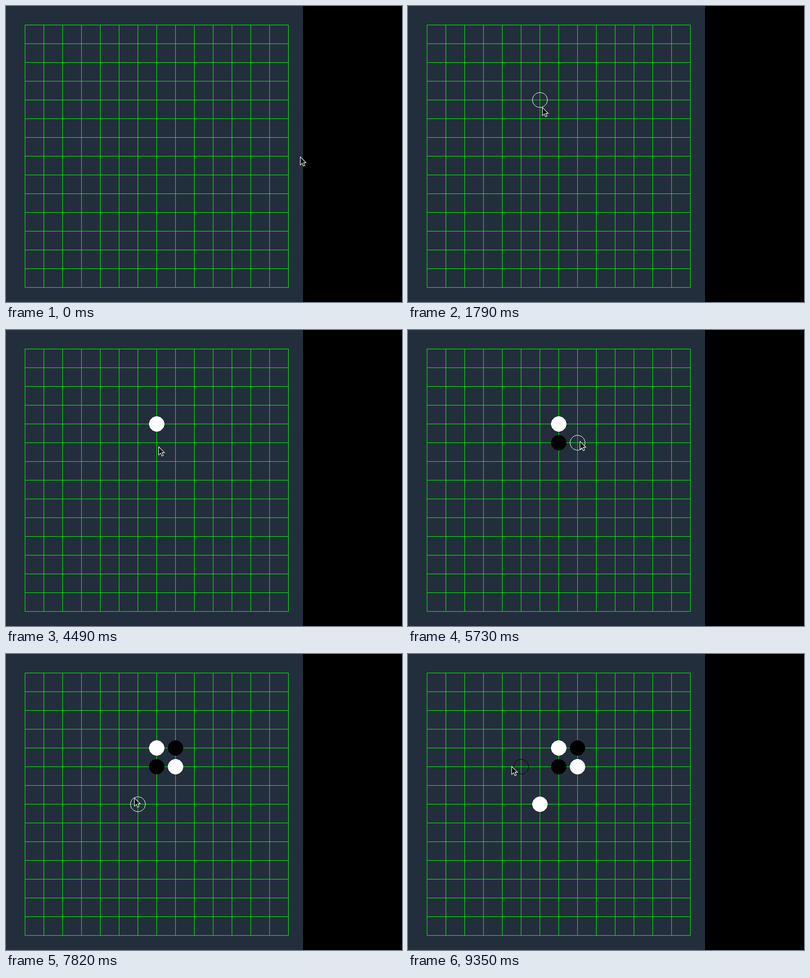
An HTML page for the animation above (9.45 s loop, 800 by 600 pixels).

```html
<!DOCTYPE html>
<html lang="en">
<head>
<meta charset="utf-8">
<title>Stones on a grid</title>
<style>
  html, body { margin: 0; width: 100%; height: 100%; overflow: hidden; background: #000; }
  svg { display: block; width: 100vw; height: 100vh; }
</style>
</head>
<body>
<svg viewBox="0 0 800 600">
  <rect width="800" height="600" fill="#000"/>
  <rect width="600" height="600" fill="#232e3c"/>
  <g shape-rendering="crispEdges">
    <path id="grid" stroke="#0f0"/>
    <g id="stones"></g>
    <circle id="ring" r="15" fill="none"/>
  </g>
  <path id="cursor" d="M.5 1.8V18.3L4.4 14.7L7 20.5L9.8 19.3L7.2 13.6H12.2Z" fill="#000" stroke="#fff" stroke-width="1.1"/>
</svg>
<script>
const LOOP = 9450, CELL = 38, LAST = 14;
const SVG = "http://www.w3.org/2000/svg";
const $ = id => document.getElementById(id);
const node = i => CELL * (i + 1) + 0.5;
const nearest = v => Math.round(v / CELL) - 1;
const colour = turn => turn % 2 ? "#000" : "#fff";
const show = (el, on) => { el.style.display = on ? "" : "none"; };

function make(tag, attrs) {
  const el = document.createElementNS(SVG, tag);
  for (const key in attrs) el.setAttribute(key, attrs[key]);
  return el;
}

// pointer strokes: start, end, curve from where the last one stopped
const strokes = [
  [100, 1070, "C190 140 180 90 436 274"],
  [1070, 2030, "C470 300 268 310 268 240S300 150 302 216"],
  [2030, 2240, "L298 188"],
  [2340, 2380, "L298 191"],
  [3380, 3740, "L302 226"],
  [3900, 4490, "C250 235 360 262 308 235"],
  [4490, 4660, "L302 229"],
  [5510, 5730, "L347 224"],
  [6120, 6580, "L341 188"],
  [6730, 6860, "L342 144"],
  [6860, 7680, "C330 20 130 330 277 307"],
  [7680, 7820, "L259 290"],
  [8220, 9180, "C295 275 240 265 236 216"],
  [9180, 9350, "L209 226"]
];

let from = "594 304";
const trail = strokes.map(([start, end, curve]) => {
  const path = make("path", { d: `M${from}${curve}` });
  from = curve.match(/\d+ \d+$/)[0];
  return { start, end, path, length: path.getTotalLength() };
});

function pointer(t) {
  const s = trail.findLast(s => s.start <= t) || trail[0];
  const u = Math.min(1, Math.max(0, (t - s.start) / (s.end - s.start)));
  const p = s.path.getPointAtLength(u * s.length);
  return [Math.round(p.x), Math.round(p.y)];
}

// time, column, row; white plays first
const moves = [
  [2880, 7, 4], [5110, 7, 5], [6020, 8, 5], [6770, 8, 4], [7960, 6, 7]
];
const stones = moves.map(([, col, row], i) => $("stones").appendChild(
  make("circle", { cx: node(col), cy: node(row), r: 15.5, fill: colour(i) })
));

let lines = "";
for (let i = 0; i <= LAST; i++) lines += `M${node(i)} 38V571M38 ${node(i)}H571`;
$("grid").setAttribute("d", lines);

function draw(t) {
  const [x, y] = pointer(t);
  const col = nearest(x), row = nearest(y);
  const played = moves.filter(m => m[0] <= t);
  const taken = played.some(m => m[1] === col && m[2] === row);
  const blink = t >= 4490 && t < 4540;
  const ring = $("ring");
  ring.setAttribute("cx", node(col));
  ring.setAttribute("cy", node(row));
  ring.setAttribute("stroke", colour(played.length));
  show(ring, !taken && !blink && col <= LAST && row <= LAST);
  stones.forEach((s, i) => show(s, i < played.length));
  $("cursor").setAttribute("transform", `translate(${x} ${y})`);
}

const begin = performance.now();
function tick() {
  draw((performance.now() - begin) % LOOP);
  requestAnimationFrame(tick);
}
tick();
</script>
</body>
</html>
```
